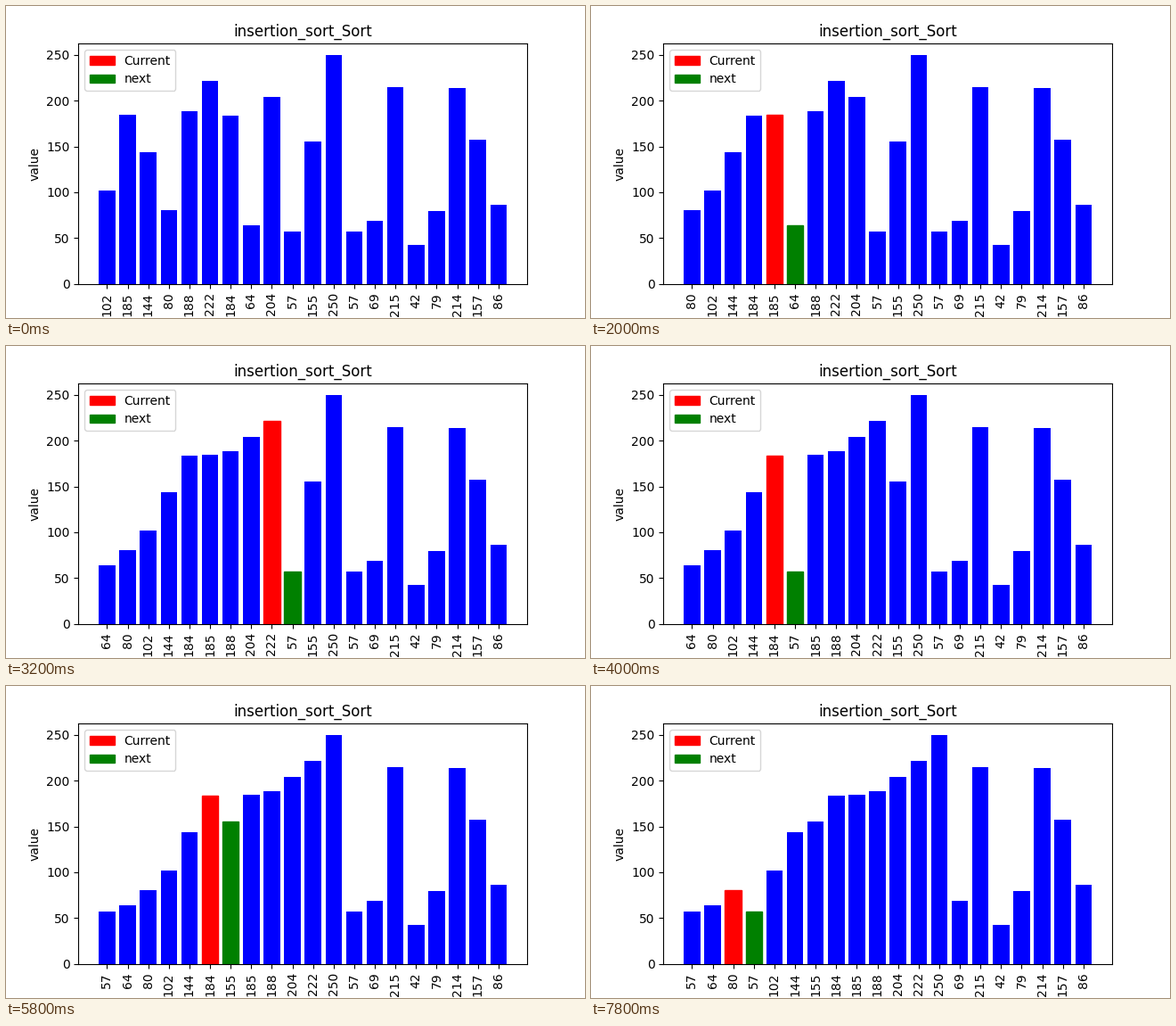
A matplotlib script that plays this animation: 650x350 px, repeating every 8000 ms.

```python
import matplotlib.pyplot as plt
from matplotlib.animation import FuncAnimation
from matplotlib.patches import Patch

VALUES = [102, 185, 144, 80, 188, 222, 184, 64, 204, 57,
          155, 250, 57, 69, 215, 42, 79, 214, 157, 86]
FRAMES = 40
INTERVAL = 200


def insertion_steps(values):
    """Yield the list and the left index of the pair about to be swapped."""
    data = list(values)
    yield data[:], None
    for i in range(1, len(data)):
        j = i - 1
        while j >= 0 and data[j] > data[j + 1]:
            yield data[:], j
            data[j], data[j + 1] = data[j + 1], data[j]
            j -= 1


steps = [step for step, _ in zip(insertion_steps(VALUES), range(FRAMES))]

fig, ax = plt.subplots(figsize=(6.5, 3.5), dpi=100)
slots = range(len(VALUES))
bars = ax.bar(slots, VALUES, color="blue")
ax.set_title("insertion_sort_Sort")
ax.set_ylabel("value")
ax.set_xticks(slots)
labels = ax.set_xticklabels(VALUES, rotation=90)
ax.legend(handles=[Patch(color="red", label="Current"),
                   Patch(color="green", label="next")], loc="upper left")


def draw(frame):
    data, pair = steps[frame]
    for bar, value in zip(bars, data):
        bar.set_height(value)
        bar.set_facecolor("blue")
        bar.set_edgecolor("none")
    if pair is not None:
        bars[pair].set_color("red")
        bars[pair + 1].set_color("green")
    ax.set_xticklabels(data, rotation=90)
    return list(bars)


anim = FuncAnimation(fig, draw, frames=FRAMES, interval=INTERVAL,
                     init_func=lambda: draw(0), repeat=True, repeat_delay=0)
plt.show()
```
